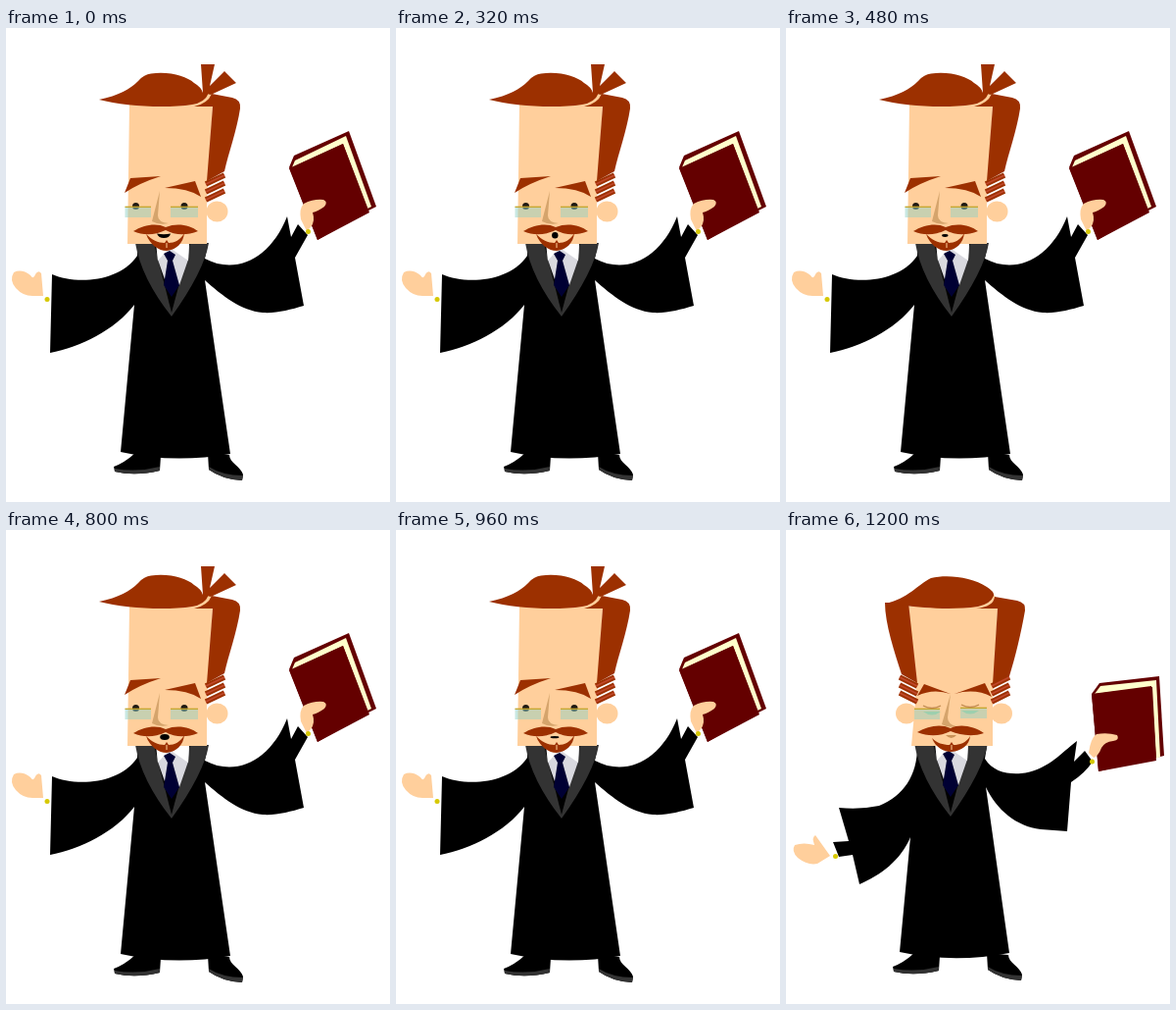
Animation of 392 by 483 pixels, one loop 1.52 s. Source, as an HTML page:

```html
<!DOCTYPE html>
<html lang="en">
<head>
<meta charset="utf-8">
<title>Speaker with a book</title>
<style>
  html, body { margin: 0; width: 100%; height: 100%; overflow: hidden; background: #fff; }
  svg { display: block; width: 392px; height: 483px; }
</style>
</head>
<body>
<svg id="stage" viewBox="0 0 392 483"></svg>
<script>
const SKIN = '#ffcf9c', HAIR = '#9c3000', RED = '#640000', CREAM = '#ffffcc',
      BLACK = '#000', GREY = '#333', GOLD = '#d6c800', SHADE = '#d5a46c';

const shape = (fill, d) => `<path fill="${fill}" d="${d}Z"/>`;
const line = (color, width, d) => `<path fill="none" stroke="${color}" stroke-width="${width}" d="${d}"/>`;
const oval = (fill, x, y, rx, ry = rx) => `<ellipse fill="${fill}" cx="${x}" cy="${y}" rx="${rx}" ry="${ry}"/>`;
const group = (id, parts, dx = 0, dy = 0) => `<g id="${id}" transform="translate(${dx} ${dy})">${parts.join('')}</g>`;

// Three slanted bands of a sideburn, from the outer end to the inner end.
const sideburn = (outer, inner, y) => [0, 8, 16].map(step => {
  const band = `M${outer} ${y + step}L${inner} ${y + step + 9}`;
  return line(HAIR, 5.4, band) + line('#c0482c', 1.6, band);
}).join('');

const lens = (x, y, width) =>
  `<rect x="${x}" y="${y}" width="${width}" height="11" fill="#91d1c6" fill-opacity=".5"/>` +
  line('#c4a52c', 1.3, `M${x} ${y + .3}H${x + width}`);

const closedEye = (x, y) =>
  shape('#9dcfae', `M${x - 9} ${y + 3}Q${x} ${y + 10} ${x + 9} ${y + 3}`) +
  line('#c18a50', 1.4, `M${x - 9} ${y - 3}Q${x} ${y + 2} ${x + 9} ${y - 3}`);

const shoes = [
  shape(BLACK, 'M110 447Q121 443 132 433L158 436L157 451Q132 457 111 452'),
  shape(GREY, 'M111 449Q134 453 157 447V451Q132 457 111 452'),
  shape(BLACK, 'M206 433L228 435C228 443 240 447 242 455L241 461Q221 460 207 450'),
  shape(GREY, 'M207 447Q221 456 242 456L241 461Q221 460 207 450')
];

const collar = [
  shape(GREY, 'M132 219H153L169 282L187 219H207Q202 248 169 294Q138 255 132 219'),
  shape(BLACK, 'M151 219H188L169 290'),
  shape('#d9d9df', 'M154 219H187L186 236L177 262H164L155 236'),
  shape('#fff', 'M153 219H166L164 227L155 237'),
  shape('#fff', 'M167 219H187L186 237L170 226'),
  shape('#000033', 'M161 230L167 227L173 231L170 237L177 262L169 274L161 262L165 237')
];

const openArms = [
  ...shoes,
  shape(BLACK, 'M134 221V232C115 260 70 261 47 251L45 331C76 325 111 308 131 282L117 432Q171 444 229 434L203 257C221 273 240 288 262 290C276 291 290 287 304 283L295 234L308 211L298 200L291 213L287 192C270 235 235 252 203 235L206 221'),
  ...collar,
  shape(SKIN, 'M38 273L36 250Q33 246 30 251Q28 257 25 252Q16 245 8 249Q3 257 10 265Q17 273 27 273'),
  oval(GOLD, 42, 276.5, 2.5),
  shape(RED, 'M289 142L294 130L350 105L378 182L370 186L318 216'),
  shape(CREAM, 'M292 142L295 135L347 110L373 182L369 184L344 118'),
  shape(RED, 'M289 143L344 118L371 188L318 216'),
  shape(SKIN, 'M301 195Q299 184 304 179Q314 174 324 175Q329 177 325 182Q318 187 313 188Q316 197 311 203L307 207'),
  oval(GOLD, 308.5, 207.5, 2.5),
  oval(SKIN, 215.5, 187, 11, 10.5),
  shape(SKIN, 'M126 78L190 76L209 66L211 80L205 172V220H124'),
  shape(HAIR, 'M210 67L231 71Q240 73 239 82C236 103 227 128 223 146L205 156L211 80H192Q206 77 210 67'),
  sideburn(223, 204, 150),
  shape(HAIR, 'M95 73C115 69 127 62 135 54Q141 47 148 46.5C167 44 184 49 192 56Q199 60 201 66H207Q203 76 190 78C164 82 121 80 95 73'),
  shape(HAIR, 'M199 37H213L208 59L223 44L235 56L209 68L201 66'),
  shape(HAIR, 'M121 168L127 153L158 151Q136 158 121 168'),
  shape(HAIR, 'M162 163L193 156L199 172Q186 163 162 163'),
  shape(SHADE, 'M157 166L149 197Q156 201 166 199Q155 198 155 191'),
  oval('#201a12', 132.5, 181.5, 3.5), oval('#201a12', 182, 181.5, 3.5),
  lens(121.5, 182, 26.5), lens(168, 182, 28),
  shape(HAIR, 'M130 207C140 201 153 198 163 203C175 198 188 201 196 207C184 212 172 211 163 206C152 211 141 212 130 207'),
  shape(HAIR, 'M143 210C147 221 156 227 164 227C174 226 181 219 182 209C178 216 172 219 166 219L164 216L162 219C155 219 149 216 143 210'),
  line(SKIN, 1, 'M164 219V224'),
  '<path id="mouth"/>'
];

const closedEyes = [
  group('feet', shoes, -1, -2),
  shape(BLACK, 'M134 221C134 250 120 271 95 281Q76 285 54 283L64 317L48 318L54 333L68 331L75 361C96 352 117 337 127 313L116 430Q171 442 228 431L204 262C215 285 235 302 260 305L287 307L291 257Q305 248 313 236L305 225L294 236L297 215C280 228 265 246 240 248C225 249 211 246 203 233L205 221'),
  group('shirt', collar, -1, -2),
  shape(SKIN, 'M45 332L30 311Q26 313 29 321Q18 318 9 321Q5 327 12 334Q22 342 32 340'),
  oval(GOLD, 50.5, 332.5, 2.5),
  shape(RED, 'M312 167L320 156L381 149L386 230L319 246'),
  shape(CREAM, 'M315 167L321 159L378 153L382 231L378 233L374 160'),
  shape(RED, 'M312 167L373 159L378 235L319 246'),
  shape(SKIN, 'M309 227Q311 212 317 208Q328 206 338 209Q341 214 334 215Q325 216 322 222Q319 230 314 232'),
  oval(GOLD, 312.5, 236, 2.5),
  oval(SKIN, 123, 187, 11, 10.5), oval(SKIN, 220, 187, 11, 10.5),
  shape(SKIN, 'M124 78L196 76L213 66L216 80L211 172V220H128L133 165'),
  shape(HAIR, 'M101 74H125L134 156L118 147C111 125 101 96 101 74'),
  shape(HAIR, 'M213 68L236 72Q245 74 244 82C240 105 234 130 228 149L211 157L216 80H194Q212 78 213 68'),
  sideburn(116, 134, 150), sideburn(228, 210, 150),
  shape(HAIR, 'M101 75C125 70 135 55 148 49C165 45 190 48 205 58Q213 63 212 67Q209 75 196 78C168 82 140 79 120 77'),
  shape(HAIR, 'M134 169L141 157L168 167Q150 161 134 169'),
  shape(HAIR, 'M172 167L203 156L210 170Q193 161 172 167'),
  shape(SHADE, 'M168 167L159 198Q165 202 174 200Q165 198 165 191'),
  lens(131, 182, 26), lens(178, 181, 27),
  closedEye(149, 182), closedEye(188, 181),
  shape(HAIR, 'M134 206C145 200 157 197 168 202C178 197 192 200 202 207C190 211 178 209 168 205C158 210 146 211 134 206'),
  shape(HAIR, 'M149 212C153 222 161 226 169 226C180 225 187 219 188 210C184 217 177 219 171 219L169 216L167 219C160 219 154 217 149 212'),
  line(SKIN, 1, 'M169 219V224'),
  shape('#c99258', 'M163 209H174Q169 215 163 209')
];

const ellipse = (x, y, rx, ry) =>
  `M${x - rx} ${y}a${rx} ${ry} 0 1 0 ${2 * rx} 0a${rx} ${ry} 0 1 0 ${-2 * rx} 0Z`;
const flat = ellipse(162, 211.2, 4.4, 1.1);

const mouths = [
  'M154 209.5Q161 211 168 209.5Q167 214 161 214Q156 214 154 209.5Z',
  flat,
  ellipse(162.3, 211.3, 3.2, 3.2),
  ellipse(162.3, 211.5, 3.2, 1.4),
  flat,
  ellipse(162, 211, 4.8, 3),
  flat,
  ellipse(163.8, 210.2, 3.2, 3.2)
];

const LOOP = 1520, SYLLABLE = 160, NOD = 1200;
const stage = document.getElementById('stage');
stage.innerHTML = group('talking', openArms) + group('nodding', closedEyes);
const [talking, nodding, mouth] = ['talking', 'nodding', 'mouth'].map(id => document.getElementById(id));

function draw(ms) {
  const time = ms % LOOP;
  const isNodding = time >= NOD;
  talking.style.display = isNodding ? 'none' : '';
  nodding.style.display = isNodding ? '' : 'none';
  if (!isNodding) mouth.setAttribute('d', mouths[Math.floor(time / SYLLABLE)]);
}

const start = performance.now();
function tick() {
  draw(performance.now() - start);
  requestAnimationFrame(tick);
}
tick();
</script>
</body>
</html>
```
